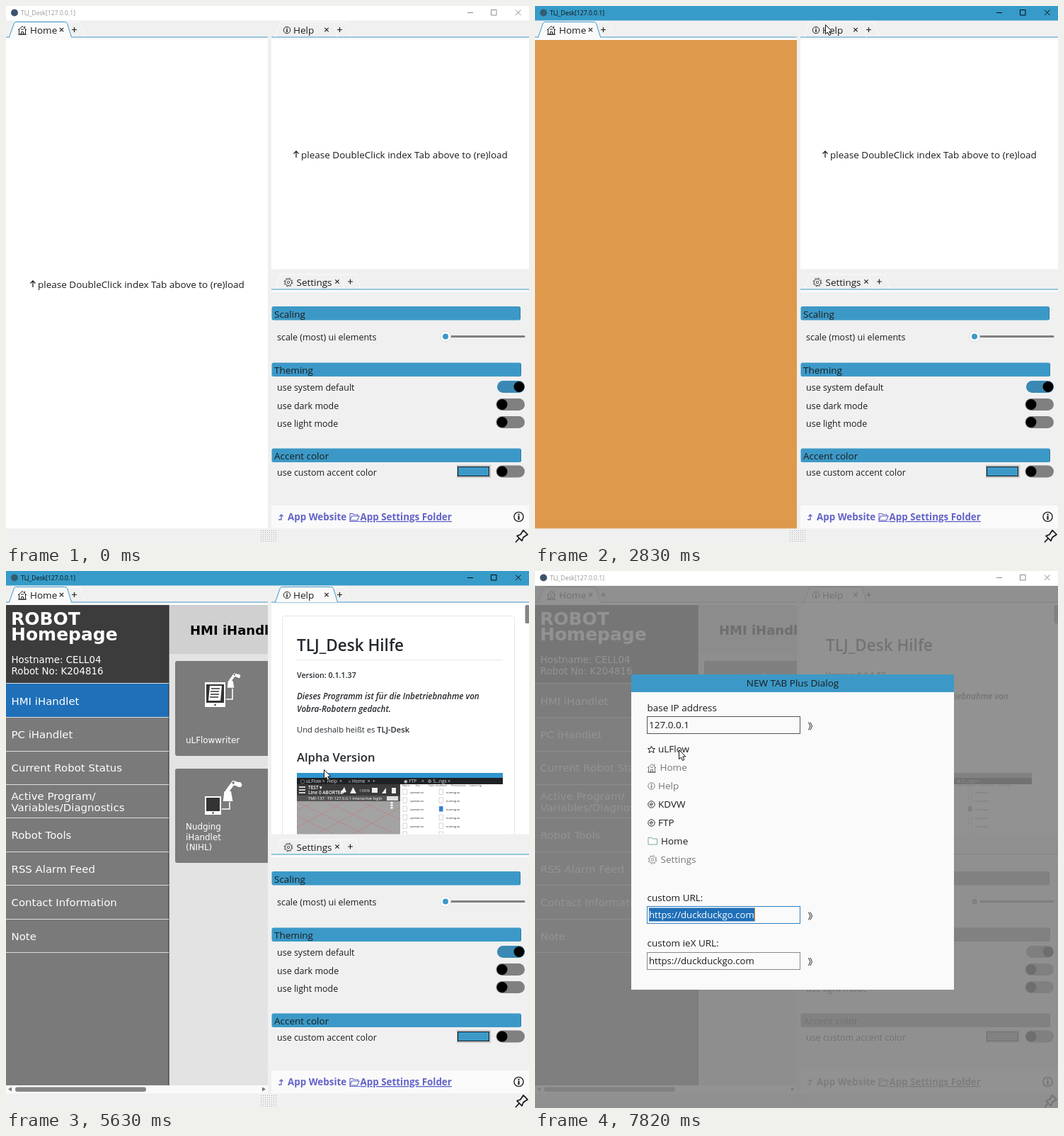
These frames come from a looping animation (739 by 758 pixels, 8 s). An HTML page:

```html
<!DOCTYPE html>
<html lang="en">
<head>
<meta charset="utf-8">
<title>Tabbed tool window</title>
<style>
html, body { margin: 0; width: 100%; height: 100%; overflow: hidden; background: #f0f0f0 }
svg { display: block }
text { font: 13.5px "Open Sans", "Noto Sans", sans-serif; fill: #1b1b1b; white-space: pre }
.s { font-size: 12.5px }
.link { font-size: 13.4px; font-weight: 700; fill: #6363c9 }
.web text { font-family: "DejaVu Sans", sans-serif; font-size: 14.95px; fill: #fff }
.web .b { font-size: 25px; font-weight: 700 }
.web .h { font-size: 18px; font-weight: 700; fill: #000 }
.web .n { font-size: 13.4px }
.web .c { font-size: 11.9px }
.doc text { font-size: 11.2px; fill: #24292e }
.doc .b, .doc tspan { font-weight: 600 }
.doc .v { font-size: 10.7px }
.doc .i { font-size: 11.7px; font-style: italic }
.tiny text { font-size: 5px; fill: #ddd }
.off text { fill: #777 }
.off use { opacity: .6 }
.line { fill: none; stroke: #222 }
.accent { fill: #3c99c7 }
</style>
</head>
<body>
<svg id="stage" width="739" height="758" viewBox="0 0 739 758">
<defs>
  <g id="house" class="line"><path d="M-6 0L0-5.500 6 0M-4.500-1V6H4.500V-1M-6 6H6M-1.500 6V2.500H1.500V6M-2-1H2M3.500-3V-5.500"/></g>
  <g id="info" class="line"><circle r="4.700"/><path d="M0-1V3M0-3V-1.700" stroke-width="1.600"/></g>
  <g id="gear" class="line" stroke-width=".8"><circle r="5.900" stroke-dasharray="2.600 2"/><circle r="4.600"/><circle r="1.700"/></g>
  <g id="ie" class="line"><circle r="4.700"/><path d="M-2 0H2A2 2 0 1 0 1.300 1.600" stroke-width=".8"/></g>
  <path id="x" class="line" d="M-2.700-2.700L2.700 2.700M-2.700 2.700L2.700-2.700" stroke-width="1.200"/>
  <path id="plus" class="line" d="M-3.500 0H3.500M0-3.500V3.500" stroke-width="1.200"/>
  <path id="tab" d="M-11 21.500L-4 1.500Q-3 0-1 0H67Q70 0 71 2L77 21.500"/>
  <path id="more" class="line" d="M-2.500-5.500L0 0-2.500 5.500M0-5.500L2.500 0 0 5.500"/>
  <g id="hint">
    <path class="line" d="M4-1V-10M.500-6.500L4-10 7.500-6.500" stroke-width="1.300"/>
    <text x="11">please DoubleClick index Tab above to (re)load</text>
  </g>
  <g id="arm" fill="#fff">
    <path d="M14 5L3 17M14 5L26 8" stroke="#fff" stroke-width="6" stroke-linecap="round"/>
    <path d="M-2 17H10L13 31H-4ZM23 4H27V11H22Z"/>
    <circle cx="14" cy="5" r="2" fill="#7b7b7b"/>
  </g>
</defs>

<rect width="739" height="758" fill="#f0f0f0"/>
<g id="main">
  <!-- left pane -->
  <path d="M0 46H370" stroke="#fafafa" stroke-width="4"/>
  <path d="M86 23H104L112 43" fill="none" stroke="#fafafa"/>
  <path d="M0 44H5M92 44H370" stroke="#3c99c7" stroke-width="1.200"/>
  <use href="#tab" x="15.500" y="22.500" fill="#fafafa" stroke="#3c99c7"/>
  <use href="#house" x="23" y="34"/><text x="34" y="39">Home</text>
  <use href="#x" x="78.500" y="33.500"/><use href="#plus" x="96.500" y="33.500"/>
  <rect id="homeBg" y="48" width="370" height="689.500"/>
  <use id="homeHint" href="#hint" x="34" y="398"/>
  <svg id="homePage" class="web" y="48" width="370" height="690" viewBox="0 48 370 690">
    <rect y="48" width="370" height="678" fill="#e3e3e3"/>
    <rect x="230" y="48" width="140" height="69" fill="#d0d0d0"/>
    <rect y="48" width="230" height="678" fill="#7a7a7a"/>
    <rect y="48" width="230" height="110" fill="#3c3c3c"/>
    <rect y="159" width="230" height="47" fill="#1f70b8"/>
    <path d="M230 48V726" stroke="#222"/>
    <text class="b" x="7" y="76">ROBOT</text><text class="b" x="7" y="98">Homepage</text>
    <text class="n" x="7.500" y="130">Hostname: CELL04</text>
    <text class="n" x="7.500" y="146">Robot No: K204816</text>
    <g id="menu"></g>
    <text class="h" x="260" y="90">HMI iHandlet</text>
    <rect x="239" y="127" width="140" height="134" rx="3" fill="#7b7b7b"/>
    <rect x="239" y="279" width="140" height="133" rx="3" fill="#7b7b7b"/>
    <path d="M281 157H310V192H281Z" fill="#fff"/><path d="M283 160H308V186H283Z" fill="#333"/>
    <path d="M288 162H305L303 183H286Z" fill="#fff"/>
    <path d="M290 166H302M289 170H301M289 174H301M288 178H300" stroke="#333" stroke-width="1.500"/>
    <path d="M311 181H320V166M305 336H316V326" fill="none" stroke="#fff" stroke-width="1.600"/>
    <use href="#arm" transform="translate(315 143)scale(.56 .7)"/>
    <path d="M281 318H304V344H281Z" fill="#fff"/><path d="M283 320H302V339H283Z" fill="#333"/>
    <use href="#arm" transform="translate(310 294)scale(.8 1)"/>
    <circle cx="295.500" cy="189" r="1.200" fill="#333"/><circle cx="292.500" cy="341.500" r="1.200" fill="#333"/>
    <text class="c" x="254" y="243">uLFlowwriter</text>
    <text class="c" x="254" y="365">Nudging</text><text class="c" x="254" y="380">iHandlet</text><text class="c" x="254" y="394">(NIHL)</text>
    <rect y="726" width="370" height="11.500" fill="#fafafa"/>
    <rect x="13" y="728.500" width="185" height="6.500" rx="3.200" fill="#858585"/>
    <path d="M3 731.500L8 728.500V734.500ZM367 731.500L362 728.500V734.500Z" fill="#777"/>
  </svg>

  <!-- help pane -->
  <path d="M375 46H739" stroke="#fafafa" stroke-width="4"/>
  <path d="M462 23H479L487 43" fill="none" stroke="#fafafa"/>
  <path d="M375 44H739" stroke="#3c99c7" stroke-width="1.200"/>
  <use id="helpTab" href="#tab" x="391.500" y="22.500"/>
  <use href="#info" x="397" y="34"/><text x="406" y="39">Help</text>
  <use href="#x" x="453" y="33.500"/><use href="#plus" x="471.500" y="33.500"/>
  <rect id="helpBg" x="375" y="48" width="364" height="323.500"/>
  <use id="helpHint" href="#hint" x="406" y="215"/>
  <svg id="helpPage" class="doc" x="375" y="48" width="364" height="323.500" viewBox="375 48 364 323.500">
    <rect x="375" y="48" width="364" height="324" fill="#fff"/>
    <rect x="390.500" y="63.500" width="328" height="400" rx="3" fill="none" stroke="#e6e6e6"/>
    <text class="b" x="411" y="113" style="font-size:22.500px">TLJ_Desk Hilfe</text>
    <path d="M411 125.500H702" stroke="#e8e8e8"/>
    <text class="b v" x="411" y="151">Version: 0.1.1.37</text>
    <text class="b i" x="411" y="181">Dieses Programm ist für die Inbetriebnahme von</text>
    <text class="b i" x="411" y="199">Vobra-Robotern gedacht.</text>
    <text x="411" y="228">Und deshalb heißt es <tspan>TLJ-Desk</tspan></text>
    <text class="b" x="411" y="269" style="font-size:16.600px">Alpha Version</text>
    <g class="tiny">
      <rect x="411" y="285" width="291" height="100" fill="#fff"/>
      <rect x="411" y="285" width="291" height="8" fill="#2f95cf"/>
      <rect x="411" y="292" width="291" height="9" fill="#202124"/>
      <rect x="411" y="301" width="146" height="17" fill="#3a3a3a"/>
      <rect x="411" y="317" width="146" height="8" fill="#555"/>
      <rect x="411" y="325" width="146" height="50" fill="#a3a3a3"/>
      <path id="floor" fill="none" stroke="#c08080" stroke-width=".7"/>
      <path d="M414 305H423M414 309H423M414 313H423" stroke="#fff" stroke-width="1.500"/>
      <path d="M472 314L478 305 481 312M486 314L490.500 305 495 314ZM517 306H525V313H517ZM531 314L537 306V314ZM545 306H551V314H545Z" fill="#eee"/>
      <text x="416" y="299" style="font-size:6.500px">▢ uLFlow ×  Help  ×     ⌂ Home  ×  +</text>
      <text x="562" y="299" style="font-size:6.500px">◉ FTP    ×   ⚙ S...ngs ×</text>
      <text class="b" x="427" y="308" style="font-size:6.500px;fill:#fff">TEST▼</text>
      <text class="b" x="427" y="315" style="font-size:6.500px;fill:#fff">Line 0 ABORTED</text>
      <text x="499" y="312" style="font-size:6px">100%</text>
      <text x="427" y="323" style="font-size:5.700px;fill:#fff">TMF-137   TP: 127.0.0.1 interactive login</text>
      <rect x="538" y="318" width="16" height="6" fill="#ddd"/>
      <path d="M545 326V336" stroke="#fff" stroke-width="3" stroke-dasharray="2.500 1"/>
      <g id="files"></g>
    </g>
    <rect x="733.500" y="48" width="6" height="26" rx="2" fill="#858585"/>
  </svg>

  <!-- settings pane -->
  <path d="M375 402H739" stroke="#fafafa" stroke-width="4"/>
  <path d="M381 400L388 379H472L478 399M472 379H494L501 399" fill="none" stroke="#fafafa"/>
  <path d="M375 400H739" stroke="#3c99c7" stroke-width="1.200"/>
  <use href="#gear" x="399" y="390"/><text x="410.500" y="395">Settings</text>
  <use href="#x" x="468" y="389"/><use href="#plus" x="486.500" y="389"/>
  <g id="settings"></g>
  <path d="M621 466.500H732" stroke="#808080" stroke-width="3" stroke-linecap="round"/>
  <circle cx="621" cy="466.500" r="7.500" fill="#fff" stroke="#ddd"/><circle class="accent" cx="621" cy="466.500" r="4"/>
  <rect x="637.500" y="648.500" width="47" height="17" fill="#ddd" stroke="#bbb"/>
  <rect class="accent" x="638.500" y="650.500" width="44" height="13" stroke="#111"/>
  <rect x="375" y="705" width="364" height="32.500" fill="#fafafa"/>
  <path d="M385 725H389V718M386.500 720.500L389 718 391.500 720.500" fill="none" stroke="#6363c9" stroke-width="1.300"/>
  <text class="link" x="398" y="726">App Website</text>
  <path d="M486 726V716.500H490L491.500 718H497V720M486 726L488.500 720H499L496.500 726ZM485 727.500H500" fill="none" stroke="#6363c9" stroke-width="1.100"/>
  <text class="link" x="500.500" y="726" text-decoration="underline">App Settings Folder</text>
  <use href="#info" transform="translate(724.500 721)scale(1.400)"/>

  <!-- status bar -->
  <path d="M360 740.500H382M360 743.500H382M360 746.500H382M360 749.500H382M360 752.500H382M360 755.500H382" stroke="#aaa" stroke-dasharray="1 2"/>
  <path d="M720 757L725 751.500M722 748L729 755 731 750 737 746 731 740 727 746Z" fill="none" stroke="#111" stroke-width="1.700" stroke-linejoin="round"/>
</g>

<g id="dialog">
  <rect y="21" width="739" height="737" fill="#808080" opacity=".86"/>
  <rect x="136" y="146" width="456" height="445" fill="#fafafa"/>
  <rect class="accent" x="136" y="146" width="456" height="25"/>
  <text x="364" y="163" text-anchor="middle">NEW TAB Plus Dialog</text>
  <text x="158.500" y="198">base IP address</text>
  <rect id="ip" x="158.500" y="205.500" width="216" height="24" fill="#fafafa"/>
  <text x="161" y="222">127.0.0.1</text>
  <path class="line" d="M164.500 247L166 250.500H169.500L167 253 168 256.500 164.500 254.500 161 256.500 162 253 159.500 250.500H163Z"/>
  <text x="174" y="256">uLFlow</text>
  <g class="off">
    <use href="#house" x="165" y="278"/><text x="176.500" y="282">Home</text>
    <use href="#info" x="164.500" y="303.500"/><text x="174" y="308">Help</text>
    <use href="#gear" x="166" y="407.500"/><text x="177.500" y="412">Settings</text>
  </g>
  <use href="#ie" x="164.500" y="329.500"/><text x="174" y="334">KDVW</text>
  <use href="#ie" x="164.500" y="355.500"/><text x="174" y="360">FTP</text>
  <path d="M160 386V376.500H165L166 378H172.500V386Z" fill="#fff" stroke="#7fa39c"/><text x="178" y="386">Home</text>
  <text x="158.500" y="466">custom URL:</text>
  <rect x="158.500" y="473.500" width="216" height="24" fill="#fafafa" stroke="#2f80c0"/>
  <rect x="161" y="475.500" width="149.500" height="19" fill="#1f6fb8"/>
  <text x="161" y="490" style="font-size:13.200px;fill:#fff">https://duckduckgo.com</text>
  <path id="caret" d="M310.500 475.500V494.500" stroke="#d98c3a"/>
  <text x="158.500" y="530">custom ieX URL:</text>
  <rect x="158.500" y="538.500" width="216" height="24" fill="#fafafa" stroke="#888"/>
  <text x="161" y="555" style="font-size:13.200px">https://duckduckgo.com</text>
  <use href="#more" x="389" y="219"/><use href="#more" x="389" y="487"/><use href="#more" x="389" y="551.500"/>
</g>

<!-- title bar -->
<rect id="bar" width="739" height="20.500"/>
<circle id="logo" cx="12" cy="9.500" r="5"/>
<text id="title" x="21" y="12.500" style="font-size:8.600px">TLJ_Desk[127.0.0.1]</text>
<path id="buttons" d="M652 9.500H660M685.500 5.500H693V13H685.500ZM720 5.500L727.500 13M720 13L727.500 5.500" fill="none"/>
<path id="cursor" d="M0 0V13L3 10.500 5 15 7.300 14 5.300 9.500H9.300Z" fill="#fff" stroke="#111" stroke-linejoin="round"/>
</svg>

<script>
const $ = id => document.getElementById(id);
const range = n => [...Array(n).keys()];

// Static rows
const items = ['HMI iHandlet', 'PC iHandlet', 'Current Robot Status', 'Active Program/|Variables/Diagnostics',
  'Robot Tools', 'RSS Alarm Feed', 'Contact Information', 'Note'];
$('menu').innerHTML = items.map((item, i) => {
  const mid = 188.5 + i * 47.45, lines = item.split('|');
  return lines.map((s, k) => `<text x="7.500" y="${mid + (k - (lines.length - 1) / 2) * 16.5}">${s}</text>`).join('') +
    `<path d="M0 ${Math.round(mid + 17.6) + .5}H230" stroke="#ddd"/>`;
}).join('') + '<path d="M0 158.500H230" stroke="#ddd"/>';

const header = (s, y, w) => `<rect x="375.500" y="${y}" width="${w}" height="19.500" rx="2.500" class="accent"/>
  <path d="M${375 + w} ${y + 2}v16" stroke="#2b7ba3"/><text x="379" y="${y + 15.5}">${s}</text>`;
const label = (s, y) => `<text class="s" x="383" y="${y}">${s}</text>`;
const toggle = (y, on) => `<rect x="${on ? 694 : 692.5}" y="${y - 8.5}" width="${on ? 39 : 40.5}" height="17" rx="8.500"
  fill="${on ? '#3a88b3' : '#808080'}"/><circle cx="${on ? 725 : 701}" cy="${y}" r="7.500"/>`;
$('settings').innerHTML = header('Scaling', 424, 351.5) + header('Theming', 503.5, 352.5) + header('Accent color', 624.5, 352.5) +
  label('scale (most) ui elements', 472) + label('use system default', 543) + label('use dark mode', 568.5) +
  label('use light mode', 593.5) + label('use custom accent color', 663) +
  toggle(537.5, true) + toggle(562.5) + toggle(587.5) + toggle(657);

$('floor').setAttribute('d', 'M411 362L480 325M411 338L436 325M440 371L524 325M490 371L557 334M411 345L462 371M411 326L506 371M450 325L550 371M500 325L557 351');
$('files').innerHTML = range(12).map(i => {
  const x = i % 2 ? 612 : 561, y = 308 + (i >> 1) * 12;
  return `<rect x="${x}" y="${y}" width="5.500" height="7.500" fill="${i == 5 ? '#2b7de0' : '#fff'}" stroke="#bbb" stroke-width=".6"/>
    <text x="${x + 10}" y="${y + 6}" style="font-size:3.800px;fill:#222">${i % 2 ? 'numreg.va' : 'sysmain.sv'}</text>`;
}).join('') + '<text x="560" y="304" style="font-size:3.800px;fill:#444">Name        Size            Date modified      Permissions     Latest log</text>';

// Pointer moves: start, end, control point, target
const moves = [
  [400, 1170, 200, 60, 36, 28],
  [2040, 2830, 220, 7, 410, 26],
  [4600, 5260, 440, 140, 449, 280],
  [5630, 6050, 190, 70, 102, 28],
  [6960, 7820, 170, 150, 203, 252]
];
function pointer(t) {
  let x = 719, y = 762;
  for (const [a, b, cx, cy, tx, ty] of moves) {
    if (t < a) break;
    const p = Math.min(1, (t - a) / (b - a)), k = p * p * (3 - 2 * p), q = 1 - k;
    x = q * q * x + 2 * q * k * cx + k * k * tx;
    y = q * q * y + 2 * q * k * cy + k * k * ty;
  }
  return [x, y];
}

const ramp = (t, a, b) => Math.max(0, Math.min(1, (t - a) / (b - a)));
const mix = (a, b, k) => `rgb(${a.map((v, i) => Math.round(v + (b[i] - v) * k))})`;
const show = (id, on) => $(id).style.display = on ? '' : 'none';
const set = (id, attrs) => { for (const k in attrs) $(id).setAttribute(k, attrs[k]); };

// Pane stages: hint, accent flash, blank, page
function pane(name, t, flash, blank, page) {
  show(name + 'Hint', t < flash);
  show(name + 'Page', t >= page);
  set(name + 'Bg', { fill: t < flash ? '#fff' : t < blank ? '#de994d' : '#f0f0f0' });
}

function draw(t) {
  const active = ramp(t, 1550, 1720) - ramp(t, 6400, 6510);
  set('bar', { fill: mix([255, 255, 255], [54, 155, 200], active) });
  set('logo', { fill: mix([62, 82, 112], [52, 92, 115], active) });
  set('buttons', { stroke: mix([140, 140, 140], [10, 10, 10], active) });
  $('title').style.fill = mix([150, 150, 150], [15, 15, 15], active);

  pane('home', t, 1800, 2900, 3070);
  pane('help', t, 3550, 4600, 4740);
  const picked = t >= 3270;
  set('helpTab', { fill: picked ? '#fafafa' : 'none', stroke: picked ? '#3c99c7' : '#fafafa' });

  const open = t >= 6560, [x, y] = pointer(t);
  show('dialog', open);
  $('main').style.filter = open ? 'grayscale(1)' : '';
  show('caret', (t - 6560) % 1060 < 530 || t > 7750);
  set('ip', { stroke: x > 158 && x < 375 && y > 205 && y < 230 ? '#111' : '#555' });
  set('cursor', { transform: `translate(${Math.round(x) + .5} ${Math.round(y) + .5})` });
}

function tick() {
  draw(performance.now() % 8000);
  requestAnimationFrame(tick);
}
tick();
</script>
</body>
</html>
```
